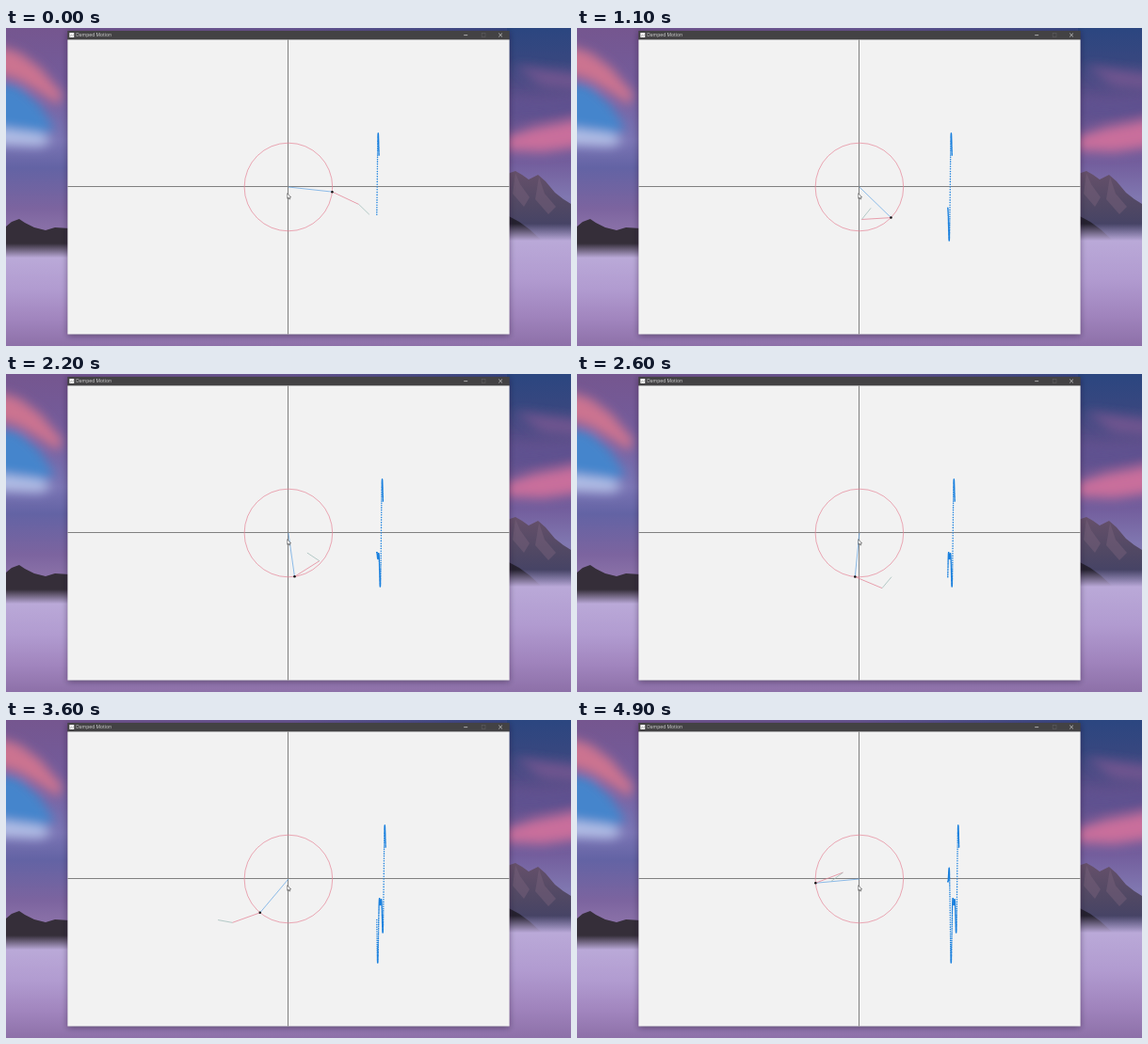
Animation, 600 px wide and 338 px high, one loop 5 s. Source, as an HTML page:

```html
<!DOCTYPE html>
<html lang="en">
<head>
<meta charset="utf-8">
<title>Damped Motion</title>
<style>
  html, body { margin: 0; width: 100%; height: 100%; overflow: hidden; background: #8f74ac; }
  svg { display: block; width: 100vw; height: 100vh; }
  .title { font: 5px "Open Sans", "Noto Sans", sans-serif; fill: #d6d6d6; }
  .line { fill: none; stroke-width: .7; }
</style>
</head>
<body>
<svg viewBox="0 0 600 338" preserveAspectRatio="none">
  <defs>
    <linearGradient id="west" x2="0" y2="1">
      <stop offset="0" stop-color="#75568f"/>
      <stop offset=".25" stop-color="#735c9c"/>
      <stop offset=".5" stop-color="#7a74b4"/>
      <stop offset=".62" stop-color="#6363a4"/>
      <stop offset=".8" stop-color="#7c649f"/>
      <stop offset="1" stop-color="#9a80b2"/>
    </linearGradient>
    <linearGradient id="east" x2="0" y2="1">
      <stop offset="0" stop-color="#2b4680"/>
      <stop offset=".14" stop-color="#37477f"/>
      <stop offset=".32" stop-color="#5f4f8b"/>
      <stop offset=".6" stop-color="#735e9d"/>
      <stop offset=".75" stop-color="#8077b0"/>
      <stop offset="1" stop-color="#8d83b8"/>
    </linearGradient>
    <linearGradient id="top">
      <stop offset="0" stop-color="#7a5a93"/>
      <stop offset=".5" stop-color="#6d5a96"/>
      <stop offset="1" stop-color="#2b4680"/>
    </linearGradient>
    <linearGradient id="fog" x2="0" y2="1">
      <stop offset="0" stop-color="#b7a6d6" stop-opacity="0"/>
      <stop offset=".14" stop-color="#baa9d8"/>
      <stop offset=".45" stop-color="#b19bd0"/>
      <stop offset=".75" stop-color="#a084bd"/>
      <stop offset="1" stop-color="#8d70a8"/>
    </linearGradient>
    <linearGradient id="rock" x2="0" y2="1">
      <stop offset="0" stop-color="#66506a"/>
      <stop offset=".5" stop-color="#504864"/>
      <stop offset="1" stop-color="#3d3f66"/>
    </linearGradient>
    <filter id="soft" x="-50%" y="-50%" width="200%" height="200%"><feGaussianBlur stdDeviation="6"/></filter>
    <filter id="shade" x="-10%" y="-10%" width="120%" height="120%"><feGaussianBlur stdDeviation="3"/></filter>
  </defs>

  <rect width="600" height="338" fill="url(#top)"/>
  <rect width="68" height="240" fill="url(#west)"/>
  <rect x="532" width="68" height="240" fill="url(#east)"/>
  <g filter="url(#soft)">
    <path d="M-12 56L14 62 36 82 52 108 30 118-12 112Z" fill="#4585cc"/>
    <path d="M-12 18L14 26 36 42 60 70 56 82 34 68 14 56-12 48Z" fill="#cc7390"/>
    <path d="M-12 106L36 112 50 120 36 126-12 124Z" fill="#b3bfe6"/>
    <path d="M540 40L612 50V66L570 62Z" fill="#70558f"/>
    <path d="M530 116L560 106 612 96V126L570 132 530 130Z" fill="#c96e9b"/>
    <path d="M530 74L560 78 612 76V90L560 96 530 94Z" fill="#5e5190"/>
  </g>
  <path d="M532 155L541 152 548 156 555 161 565 156 573 163 583 175 592 182 600 187V226H532Z" fill="url(#rock)"/>
  <path d="M541 154L546 166 556 180 550 190 538 176ZM566 158L572 176 584 190 576 198 562 182Z" fill="#77607a" opacity=".5"/>
  <path d="M532 199L545 206 556 214 568 225 532 229Z" fill="#262230"/>
  <path d="M0 211L6 206 14 203 20 207 30 212 42 215 52 212 68 213V248H0Z" fill="#352e39"/>
  <rect x="532" y="208" width="68" height="130" fill="url(#fog)"/>
  <rect y="229" width="68" height="109" fill="url(#fog)"/>
  <rect x="68" y="229" width="464" height="109" fill="url(#fog)"/>

  <rect x="65.5" y="4" width="469" height="323" fill="#120c24" opacity=".45" filter="url(#shade)"/>
  <rect x="65.3" y="3" width="469.4" height="10" fill="#434244"/>
  <rect x="65.4" y="12.4" width="469.2" height="313.1" fill="#f2f2f2"/>
  <rect x="67.3" y="5" width="5" height="5" rx=".5" fill="#f4f4f4"/>
  <path d="M68 9.2l1.4-1.7 1 .9 1.2-1" fill="none" stroke="#777" stroke-width=".5"/>
  <text class="title" x="74.2" y="9.4">Damped Motion</text>
  <g fill="none" stroke="#d8d8d8" stroke-width=".7">
    <path d="M486.2 7.6h4M523.2 5.6l3.8 3.8m0-3.8l-3.8 3.8"/>
    <rect x="505.2" y="5.6" width="3.8" height="3.8" stroke="#5c5b5d"/>
  </g>

  <path d="M299.5 12.4V325.5M65.4 168.5H534.6" stroke="#808080"/>
  <circle class="line" cx="299.9" cy="169" r="46.8" stroke="#e58497"/>
  <path id="trace" fill="none" stroke="#1a80de" stroke-width="1.55" stroke-linecap="round"/>
  <path id="arm0" class="line" stroke="#5fa2e2"/>
  <path id="arm1" class="line" stroke="#e27a8f"/>
  <path id="arm2" class="line" stroke="#98b8b4"/>
  <circle id="joint" r="1.25" fill="#111"/>
  <path d="M298.8 175.8v5.4l1.2-1 .9 1.9 .9-.4-.8-1.8h1.6Z" fill="#fff" stroke="#222" stroke-width=".5"/>
</svg>
<script>
  const CX = 299.9, CY = 169, R = 46.8;
  const ARMS = [[R, 1], [R * 2 / 3, 4], [R / 3, 7]];
  const LOOP = 5000, TICK = 100;
  const FIRST = -0.6, START = 0.11, STEP = 0.01, SUBSTEPS = 6;
  const TRACE_X = 393.8, DRIFT = 0.0325;
  const get = id => document.getElementById(id);
  const trace = get('trace'), joint = get('joint');
  const lines = ARMS.map((_, i) => get('arm' + i));

  const height = a => ARMS.reduce((y, [r, k]) => y + r * Math.sin(k * a), CY);

  function draw(ms) {
    const tick = Math.floor(ms % LOOP / TICK);
    const angle = START + tick * SUBSTEPS * STEP;
    let x = CX, y = CY;
    ARMS.forEach(([r, k], i) => {
      const from = `M${x} ${y}`;
      x += r * Math.cos(k * angle);
      y += r * Math.sin(k * angle);
      lines[i].setAttribute('d', `${from}L${x} ${y}`);
      if (i === 0) {
        joint.setAttribute('cx', x);
        joint.setAttribute('cy', y);
      }
    });

    const count = Math.round((angle - FIRST) / STEP);
    let d = '';
    for (let n = 0; n <= count; n++) {
      d += `M${(TRACE_X + n * DRIFT).toFixed(2)} ${height(angle - n * STEP).toFixed(2)}h0`;
    }
    trace.setAttribute('d', d);
  }

  const begin = performance.now();
  function loop() {
    draw(performance.now() - begin);
    requestAnimationFrame(loop);
  }
  loop();
</script>
</body>
</html>
```
